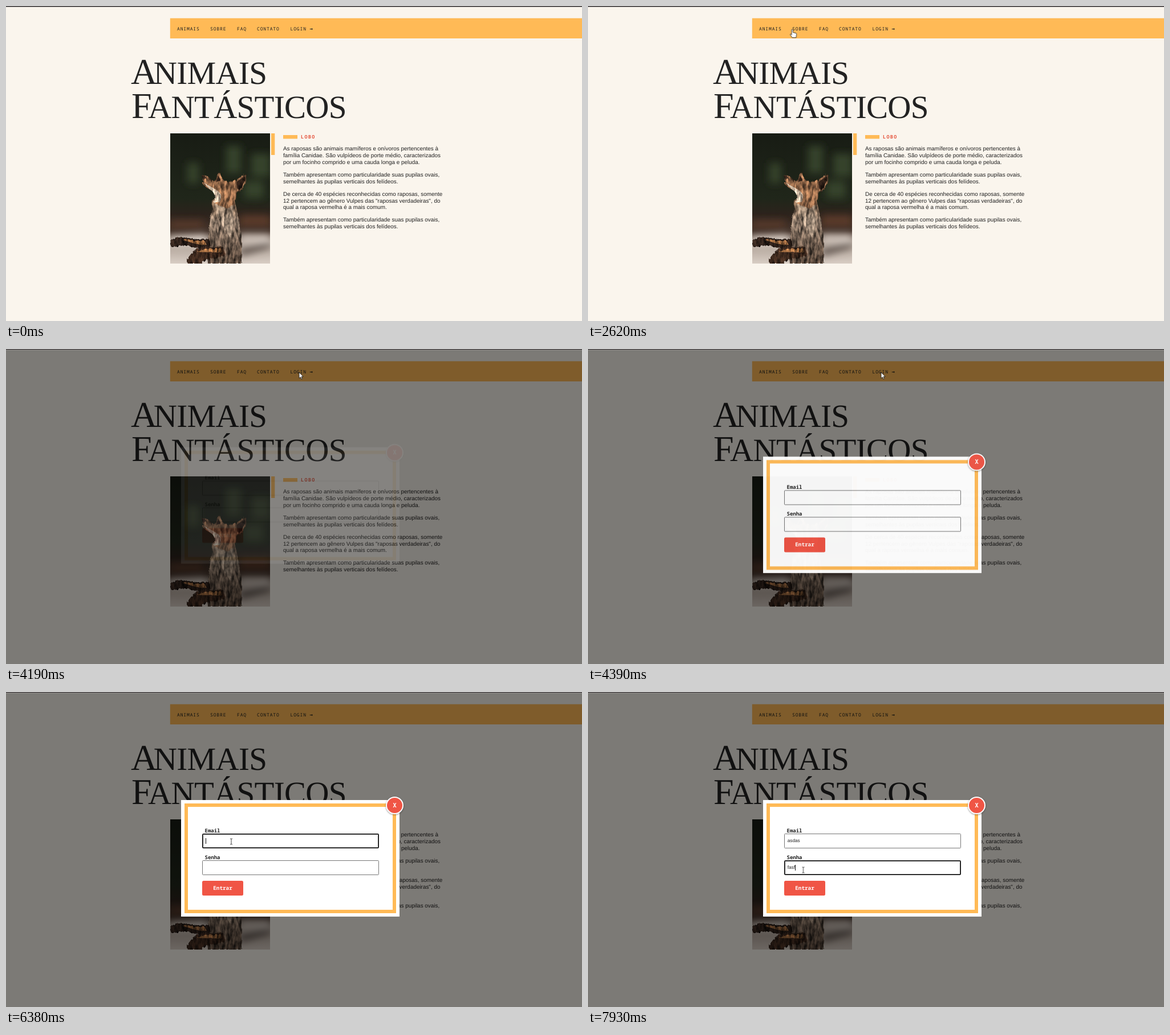
Recreate the animation shown at these times as an HTML page. Size 1010 by 554 pixels, loop 8000 ms.

```html
<!DOCTYPE html>
<html lang="pt">
<head>
<meta charset="utf-8">
<title>Animais</title>
<style>
  :root { --loop: 8s infinite; --gold: #ffba56; --red: #f05545; --mono: "Noto Sans Mono", "DejaVu Sans Mono", monospace; }
  html, body { margin: 0; width: 100%; height: 100%; overflow: hidden; background: #faf5ed; text-rendering: geometricPrecision; }
  .stage { position: absolute; left: 0; top: 0; width: 1010px; height: 554px; overflow: hidden; }
  .stage svg, .modal, .modal div, .modal span, .list, .list i, .shade, .text { position: absolute; }
  svg { left: 0; top: 0; }

  .title { font-family: "Liberation Serif", serif; font-size: 57px; letter-spacing: -.7px; fill: #222; }
  .title .cap { font-size: 64px; letter-spacing: -6.5px; }
  .nav { font: 500 8px var(--mono); letter-spacing: .87px; fill: #222; }
  .nav .to { font: 700 9px "DejaVu Sans Mono", monospace; }
  .tag { font: 700 8.4px var(--mono); letter-spacing: 1.4px; fill: #e5563f; }
  .text { left: 486px; top: 246.1px; font: 9.92px/11.85px "Liberation Sans", Arial, sans-serif; color: #222; white-space: nowrap; }
  .text p { margin: 0 0 10.2px; }

  .shade { inset: 2px 0 0; background: rgba(0, 0, 0, .5); animation: shade var(--loop) step-end; }
  .modal { left: 307px; top: 190px; width: 383px; height: 205px; background: #fff; animation: drop var(--loop) linear; }
  .modal div { box-sizing: border-box; }
  .modal .frame { inset: 6px; border: 6px solid var(--gold); }
  .modal .label { left: 41.5px; font: 700 9px/10px var(--mono); color: #222; }
  .modal .field { left: 37px; width: 309.5px; height: 26px; border: 1px solid #767676; border-radius: 1.5px; background: #fff; }
  .modal .typed { left: 4.7px; top: 7px; height: 10px; overflow: hidden; white-space: pre; border-right: 1px solid transparent;
    font: 8.27px/10px "Liberation Sans", Arial, sans-serif; color: #222; }
  .modal .send { left: 37px; top: 142px; width: 72px; height: 26px; border-radius: 2.5px; background: var(--red);
    font: 700 9.3px/26px var(--mono); color: #fff; text-align: center; }
  .modal .close { left: 359px; top: -6px; width: 31px; height: 31px; border: 2.5px solid #fff; border-radius: 50%; background: var(--red);
    box-shadow: 0 1px 3px rgba(0, 0, 0, .4); font: 700 11px/27px var(--mono); color: #fff; text-align: center; }
  .email { animation: email var(--loop) step-end; }
  .senha { animation: senha var(--loop) step-end; }
  .email .typed { animation: type-email var(--loop) step-end; }
  .senha .typed { animation: type-senha var(--loop) step-end; }

  .list { left: 405px; top: 276px; width: 87px; height: 145px; animation: fade var(--loop) linear; }
  .list .tip { left: 7.5px; top: 0; border: 5.5px solid transparent; border-top: 0; border-bottom: 5px solid #3c3c40; }
  .list .items { left: 0; top: 5px; width: 79px; padding: 3px 0 0 8px; overflow: hidden; border-radius: 2px;
    background: #3c3c40; box-shadow: 0 1px 2px rgba(0, 0, 0, .4); font: 7.6px/21.7px "Open Sans", sans-serif; color: #fff;
    position: absolute; white-space: nowrap; animation: shrink var(--loop) step-end; }

  .cursor { animation: move var(--loop) linear; }
  .arrow { animation: arrow var(--loop) step-end; }
  .hand { animation: hand var(--loop) step-end; }
  .beam { animation: beam var(--loop) step-end; }

  @keyframes shade { 0% { opacity: 0 } 52.06%, 100% { opacity: 1 } }
  @keyframes drop {
    0%, 52.06% { opacity: 0; transform: translateY(-18.6px); animation-timing-function: ease }
    55.81%, 100% { opacity: 1; transform: none }
  }
  @keyframes email {
    0% { border-color: #767676; box-shadow: none }
    74.4% { border-color: #333; box-shadow: none }
    76% { border-color: #101010; box-shadow: inset 0 0 0 .8px #101010 }
    89.5%, 100% { border-color: #767676; box-shadow: none }
  }
  @keyframes senha {
    0%, 74%, 85% { border-color: #767676; box-shadow: none }
    72.5%, 84.1%, 87.5% { border-color: #333; box-shadow: none }
    89.5%, 100% { border-color: #101010; box-shadow: inset 0 0 0 .8px #101010 }
  }
  @keyframes type-email {
    0% { width: 0; border-color: transparent }
    76% { width: 0; border-color: #111 }
    80% { width: .556em; border-color: #111 }
    81.25% { width: 1.056em; border-color: #111 }
    82.5% { width: 1.612em; border-color: #111 }
    84% { width: 2.168em; border-color: #111 }
    85.4% { width: 2.668em; border-color: #111 }
    89.5%, 100% { width: 2.668em; border-color: transparent }
  }
  @keyframes type-senha {
    0% { width: 0; border-color: transparent }
    89.5% { width: 0; border-color: #111 }
    91.6% { width: .278em; border-color: #111 }
    92.9% { width: .834em; border-color: #111 }
    94.8% { width: 1.334em; border-color: #111 }
    99%, 100% { width: 1.612em; border-color: #111 }
  }
  @keyframes fade { 0%, 79.99% { opacity: 0 } 80%, 85.6% { opacity: 1 } 87.9%, 100% { opacity: 0 } }
  @keyframes shrink { 0% { height: 132px } 82.5%, 100% { height: 67px } }

  @keyframes arrow { 0%, 13.1%, 31%, 74.6%, 87.8%, 100% { opacity: 0 } 4.875%, 16.6%, 50.5%, 83.7% { opacity: 1 } }
  @keyframes hand { 0%, 50.5%, 100% { opacity: 0 } 31% { opacity: 1 } }
  @keyframes beam { 0%, 16.6%, 83.7% { opacity: 0 } 13.1%, 74.6%, 87.8%, 100% { opacity: 1 } }
  @keyframes move {
    0%, 4.875% { transform: translate(978px, 525px) }
    8.75% { transform: translate(760px, 330px) }
    11.9% { transform: translate(520px, 160px) }
    14.5% { transform: translate(366px, 97px) }
    16.25% { transform: translate(318px, 140px) }
    18.1% { transform: translate(350px, 250px) }
    20% { transform: translate(440px, 289px) }
    21.9% { transform: translate(542px, 230px) }
    23.75% { transform: translate(490px, 175px) }
    25% { transform: translate(443px, 156px) }
    28.75% { transform: translate(395px, 95px) }
    31% { transform: translate(362px, 48px) }
    32.75% { transform: translate(358px, 41px) }
    33.75% { transform: translate(380px, 42px) }
    35.25% { transform: translate(440px, 43px) }
    39.4% { transform: translate(480px, 43px) }
    43.75%, 57.4% { transform: translate(514px, 41px) }
    60% { transform: translate(430px, 150px) }
    62.5% { transform: translate(275px, 400px) }
    64.1% { transform: translate(380px, 437px) }
    66% { transform: translate(600px, 330px) }
    67.75% { transform: translate(656px, 200px) }
    68.6% { transform: translate(648px, 178px) }
    73% { transform: translate(398px, 288px) }
    74.75%, 83.1% { transform: translate(395px, 263px) }
    85.6% { transform: translate(326px, 318px) }
    86.6% { transform: translate(330px, 321px) }
    88.4% { transform: translate(360px, 311px) }
    90%, 100% { transform: translate(377.5px, 313px) }
  }
</style>
</head>
<body>
<div class="stage">
  <svg width="1010" height="554">
    <defs>
      <linearGradient id="woods" x2="0" y2="1">
        <stop offset="0" stop-color="#181c14"/><stop offset=".5" stop-color="#20261a"/>
        <stop offset=".62" stop-color="#2c231c"/><stop offset=".75" stop-color="#44332a"/>
        <stop offset=".83" stop-color="#a89a8f"/><stop offset="1" stop-color="#d8cdc4"/>
      </linearGradient>
      <linearGradient id="fur" x2="0" y2="1">
        <stop offset="0" stop-color="#86684e"/><stop offset=".35" stop-color="#8a7767"/><stop offset="1" stop-color="#5c4a3d"/>
      </linearGradient>
      <filter id="soft" x="-50%" y="-50%" width="200%" height="200%"><feGaussianBlur stdDeviation="7"/></filter>
      <filter id="coat" color-interpolation-filters="sRGB">
        <feTurbulence type="fractalNoise" baseFrequency=".2 .07" numOctaves="3" seed="4"/>
        <feColorMatrix result="hair" values="1.8 0 0 0 -.4  1.8 0 0 0 -.4  1.8 0 0 0 -.4  0 0 0 0 1"/>
        <feDisplacementMap in="SourceGraphic" in2="hair" scale="3" xChannelSelector="R" yChannelSelector="G"/>
        <feComposite in2="hair" operator="arithmetic" k1="1.2" k2=".35"/>
      </filter>
      <clipPath id="crop"><path d="M0 0H175V229H0Z"/></clipPath>
    </defs>
    <path fill="#2a2729" d="M0 0H1010V1.6H0Z"/>
    <path fill="#ffba56" d="M287.8 21.6H1010V56.9H287.8ZM465 224h6.3v38h-6.3ZM486 227h25v6.5h-25Z"/>
    <g class="nav">
      <text x="300" y="42.5">ANIMAIS</text>
      <text x="358" y="42.5">SOBRE</text>
      <text x="405" y="42.5">FAQ</text>
      <text x="440" y="42.5">CONTATO</text>
      <text x="498.5" y="42.5">LOGIN <tspan class="to">→</tspan></text>
    </g>
    <g class="title">
      <text x="219" y="137"><tspan class="cap">A</tspan>NIMAIS</text>
      <text x="220" y="197"><tspan class="cap">F</tspan>ANTÁSTICOS</text>
    </g>
    <text class="tag" x="517" y="233.4">LOBO</text>

    <g transform="translate(288 224)" clip-path="url(#crop)">
      <path fill="url(#woods)" d="M0 0H175V229H0Z"/>
      <g filter="url(#soft)">
        <path fill="#35432a" d="M98 22h26v48h-26ZM142 36h33v40h-33ZM30 52h20v36h-20ZM130 84h34v30h-34Z"/>
        <path fill="#5b3a29" d="M0 154h58v12h-58ZM122 144h53v20h-53Z"/>
        <path fill="#e8ded6" d="M0 184l64-4v16H0ZM122 180h53v10h-53Z"/>
        <path fill="#574b45" d="M122 204l53-14v10l-53 16Z"/>
      </g>
      <g filter="url(#coat)">
        <path fill="url(#fur)" d="M73 116C72 145 64 180 66 229H124C130 195 122 155 112 114Z"/>
        <path fill="#b3a08c" d="M77 122C90 132 102 130 109 120C113 145 112 165 106 184C98 172 82 150 77 122Z" opacity=".5"/>
        <path fill="#94694a" d="M57 75C61 71 68 77 76 84L86 67L93 82C100 86 106 85 112 84L132 71C136 86 130 98 116 104C116 120 112 128 100 132L74 122C84 116 80 104 72 100C64 96 58 92 57 88Z"/>
        <path fill="#cdb8a2" d="M58 86C68 94 80 96 88 106C92 118 84 124 76 122C82 112 78 104 70 99Z"/>
        <path fill="#38261c" d="M56 75l5-1 3 6-6 2ZM116 86l14-11c2 10-2 18-12 25ZM84 74l5 9-8 2Z"/>
        <path fill="#30221b" d="M68 186C46 188 28 182 10 183C2 186-3 194 3 200C12 200 22 194 36 199C50 203 62 204 70 202Z"/>
        <path fill="#3c281d" d="M92 199C70 202 50 198 40 208C34 216 28 220 31 229H56C58 218 80 222 98 214Z"/>
        <path fill="#a56f43" d="M60 189C44 190 32 186 20 186C34 192 48 196 64 196ZM88 202C72 204 56 202 48 209C62 208 76 211 90 208Z"/>
      </g>
    </g>
  </svg>

  <div class="text">
    <p>As raposas são animais mamíferos e onívoros pertencentes à<br>família Canidae. São vulpídeos de porte médio, caracterizados<br>por um focinho comprido e uma cauda longa e peluda.</p>
    <p>Também apresentam como particularidade suas pupilas ovais,<br>semelhantes às pupilas verticais dos felídeos.</p>
    <p>De cerca de 40 espécies reconhecidas como raposas, somente<br>12 pertencem ao gênero Vulpes das "raposas verdadeiras", do<br>qual a raposa vermelha é a mais comum.</p>
    <p>Também apresentam como particularidade suas pupilas ovais,<br>semelhantes às pupilas verticais dos felídeos.</p>
  </div>

  <div class="shade"></div>
  <div class="modal">
    <div class="frame"></div>
    <span class="label" style="top:48.5px">Email</span>
    <div class="field email" style="top:59px"><span class="typed">asdas</span></div>
    <span class="label" style="top:96px">Senha</span>
    <div class="field senha" style="top:106.3px"><span class="typed">fasf</span></div>
    <div class="send">Entrar</div>
    <div class="close">X</div>
  </div>

  <div class="list">
    <i class="tip"></i>
    <div class="items">asd<br>asda<br>asdi@example.com<br>as<br>aa<br>abc</div>
  </div>

  <svg width="1010" height="554">
    <g class="cursor" fill="#fff" stroke="#111" stroke-width=".8" stroke-linejoin="round">
      <path class="arrow" d="M0 0V10.5L2.4 8.3L4 12L5.6 11.3L4 7.7H7.2Z"/>
      <path class="hand" d="M-1.2 1.2a1.2 1.2 0 0 1 2.4 0V5.5L6 6.6Q7.6 7 7.4 9L6.6 14.6H-.2L-3.6 9.6Q-4 8-2.6 8.2L-1.2 9.6Z"/>
      <path class="beam" fill="none" d="M-2-5H-.5L0-4.5L.5-5H2M0-4.5V4.5M-2 5H-.5L0 4.5L.5 5H2"/>
    </g>
  </svg>
</div>
</body>
</html>
```
